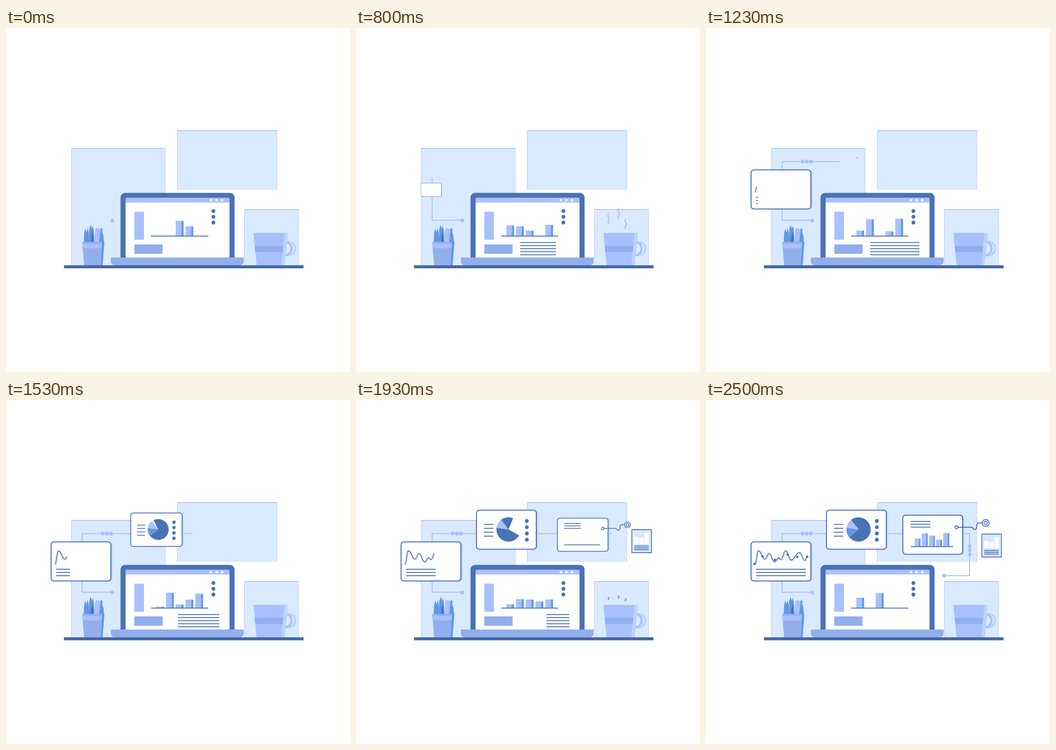
An HTML page with a canvas that plays this animation: 748x748 px, repeating every 2.71 s.

```html
<!DOCTYPE html>
<html lang="en">
<head>
<meta charset="utf-8">
<title>Desk dashboard</title>
<style>
html, body { margin: 0; width: 100%; height: 100%; overflow: hidden; background: #fff; }
canvas { display: block; }
</style>
</head>
<body>
<canvas id="stage" width="748" height="748"></canvas>
<script>
const ctx = document.getElementById('stage').getContext('2d');
const LOOP = 2710;
const REST = 2500;
const NAVY = '#4a73b5', BLUE = '#5f98e8', MID = '#92afed', LILAC = '#a9c0ff',
      SKY = '#d9eaff', PALE = '#b8d5fb', DESK = '#4766a5', EDGE = '#4668b3';

const ramp = (t, from, to) => Math.max(0, Math.min(1, (t - from) / (to - from)));
const mix = (a, b, k) => a + (b - a) * k;

// Triangle wave: 0 at the start, 1 after `half`, 0 again after twice `half`
function triangle(t, start, half) {
  const phase = (Math.max(0, t - start) / half) % 2;
  return 1 - Math.abs(1 - phase);
}

function box(x, y, w, h, color) {
  ctx.fillStyle = color;
  ctx.fillRect(x, y, w, h);
}

function rounded(x, y, w, h, r, color) {
  ctx.beginPath();
  ctx.roundRect(x, y, w, h, r);
  ctx.fillStyle = color;
  ctx.fill();
}

function dot(x, y, r, color) {
  ctx.beginPath();
  ctx.arc(x, y, r, 0, Math.PI * 2);
  ctx.fillStyle = color;
  ctx.fill();
}

function poly(color, ...points) {
  ctx.beginPath();
  points.forEach(([x, y]) => ctx.lineTo(x, y));
  ctx.fillStyle = color;
  ctx.fill();
}

function stroke(color, width) {
  ctx.strokeStyle = color;
  ctx.lineWidth = width;
  ctx.stroke();
}

// Strokes only the first `length` pixels of the current path
function strokeStart(color, width, length) {
  if (length <= 0) return;
  ctx.setLineDash([length, 2000]);
  stroke(color, width);
  ctx.setLineDash([]);
}

function rows(x0, x1, y, count = 1, gap = 0, width = 2) {
  if (x1 <= x0) return;
  for (let i = 0; i < count; i++) box(x0, y + i * gap - width / 2, x1 - x0, width, NAVY);
}

function dots(x, y, dx, dy, count, r, color) {
  for (let i = 0; i < count; i++) dot(x + i * dx, y + i * dy, r, color);
}

function bar(x, base, width, height) {
  if (height < 1.5) return;
  box(x, base - height, width, height, BLUE);
  box(x, base - height, width * 0.74, height, LILAC);
}

function scaled(cx, cy, s, draw) {
  if (s <= 0) return;
  ctx.save();
  ctx.translate(cx, cy);
  ctx.scale(s, s);
  ctx.translate(-cx, -cy);
  draw();
  ctx.restore();
}

function panel(x, y, w, h) {
  box(x, y, w, h, SKY);
  box(x, y, w, 1.3, '#a5b1f2');
  box(x, y, 1, h, '#b2bff6');
  box(x + w - 1, y, 1, h, '#c4d0fa');
}

function card(x, y) {
  rounded(x + 4, y + 1, 130, 84, 6, PALE);
  rounded(x, y, 130, 85, 6, '#fff');
  stroke(EDGE, 2);
}

function route(t) {
  const length = mix(80 * ramp(t, 0, 600), 749, ramp(t, 600, 2365));
  ctx.beginPath();
  ctx.moveTo(231, 418);
  ctx.lineTo(165.5, 418);
  ctx.lineTo(165.5, 290.5);
  ctx.lineTo(573, 290.5);
  ctx.lineTo(573, 382);
  ctx.lineTo(517, 382);
  strokeStart(LILAC, 2, length);
  dot(231, 418.5, 4.2, LILAC);
  dots(210, 290.3, 9.2, 0, 3, 4.2 * ramp(length, 235, 262), LILAC);
  dots(573.3, 318, 0, 8.8, 3, 4.2 * ramp(length, 628, 655), LILAC);
  dot(517.5, 382, 4.2 * ramp(length, 735, 748), LILAC);
}

// Peaks and valleys of the line chart
const turns = [[106, 357], [114, 328], [128, 346], [137, 334], [149, 352], [158, 343],
               [163, 347], [173, 328], [185, 348], [203, 332], [215, 349], [220, 341]];

function traceWave(shift) {
  ctx.beginPath();
  let px = 0, py = 0;
  turns.forEach(([tx, ty], i) => {
    const x = tx + shift, y = ty + shift, middle = (px + x) / 2;
    if (i) ctx.bezierCurveTo(middle, py, middle, y, x, y);
    else ctx.moveTo(x, y);
    [px, py] = [x, y];
  });
}

function waveCard(t) {
  card(98, 308.5);
  rows(109, mix(109, 217, ramp(t, 1180, 2440)), 368, 3, 7);
  const length = (t - 1150) * 0.165;
  traceWave(2);
  strokeStart('#d3e2f9', 2, length);
  traceWave(0);
  strokeStart(NAVY, 1.8, length);
  ctx.globalAlpha = ramp(t, 2200, 2450);
  [[105.5, 356.5], [123, 340], [150, 347.5], [177.5, 336], [198.5, 341], [220, 340.5]]
    .forEach(([x, y]) => dot(x, y, 2.6, NAVY));
  ctx.globalAlpha = 1;
}

function sector(from, to, color) {
  if (to <= from) return;
  const rad = Math.PI / 180;
  ctx.beginPath();
  ctx.moveTo(331.7, 281.5);
  ctx.arc(331.7, 281.5, 26.4, from * rad, to * rad);
  ctx.fillStyle = color;
  ctx.fill();
}

// A gap sweeps once around the pie, wiping the old disc ahead of the new one
function pieCard(t) {
  card(262, 239.5);
  rows(278, 298.5, 270.5, 4, 8.5);
  dots(371.5, 263, 0, 13.6, 4, 4.2, NAVY);
  const sweep = start => 232 + 360 * ramp(t, start, start + 984);
  sector(sweep(1500), 592, NAVY);
  sector(232, sweep(1766), NAVY);
  if (t < 1700 || t > 2440) sector(141, 188, BLUE);
  sector(187, 232, LILAC);
}

function chartCard(t) {
  card(428, 250.5);
  rows(445.5, 488, 264, 3, 6.2);
  const grow = ramp(t, 2000, 2440);
  [17, 28, 23.5, 14.5, 29].forEach((h, i) => bar(454 + i * 15.6, 318.5, 12.5, h * grow));
  rows(445.5, 537, 318.8);
  ctx.beginPath();
  ctx.moveTo(548, 276.8);
  ctx.lineTo(577, 276.8);
  ctx.bezierCurveTo(582, 277, 580, 281.5, 584, 281.5);
  ctx.bezierCurveTo(592, 281.5, 586, 268, 592, 267.5);
  ctx.lineTo(600, 267.5);
  stroke(EDGE, 2);
  [[544.5, 276.8, 3.3], [608, 267.5, 7.6], [608, 267.5, 3.8]].forEach(([x, y, r]) => {
    dot(x, y, r, '#fff');
    stroke(EDGE, 1.8);
  });
}

function noteCard(t) {
  const y = 282 + (t - 1930) / 60;
  scaled(621, y + 25, ramp(t, 1650, 1870), () => {
    rounded(599.7, y, 42.8, 50, 1, SKY);
    stroke('#5273b9', 1.8);
    [16, 13.5, 24].forEach((h, i) => box(605 + i * 11, y + 31 - h, 9.5, h, '#fff'));
    rows(605, 636.5, y + 35.5, 3, 4, 1.9);
  });
}

const bars = [
  { high: 23.5, start: 0, half: 820 },
  { high: 40, start: 180, half: 1160 },
  { high: 33, start: -1240, half: 1240 },
  { high: 21.5, start: -800, half: 820 },
  { high: 39, start: 0, half: 1270 }
];

function laptop(t) {
  rounded(249, 358.5, 248, 150, 10, NAVY);
  rounded(260, 369, 226, 135, [4, 4, 0, 0], '#fff');
  rounded(260, 369, 226, 10.5, [4, 4, 0, 0], LILAC);
  dots(445.5, 374.3, 12.3, 0, 3, 2.7, '#fff');
  rounded(228, 499, 289, 17.5, [1, 1, 9, 9], MID);
  rounded(279, 399.5, 21, 61, 1, LILAC);
  rounded(279, 470.5, 61.5, 20.5, 1, MID);
  dots(451, 398, 0, 12.5, 3, 4.2, NAVY);
  bars.forEach(({ high, start, half }, i) =>
    bar(327 + i * 21.2, 452.5, 16.7, high * triangle(t, start, half)));
  rows(315.5, 440, 452.5);
  rows(mix(357, 464, ramp(t, 1360, 2430)), mix(357, 464, ramp(t, 60, 1080)), 466.5, 5, 6.65);
}

function pencil(x, tip, width, color) {
  poly(color, [x, 466], [x + width * 0.15, tip + 9], [x + width / 2, tip],
       [x + width * 0.85, tip + 9], [x + width, 466]);
}

function pencilPot() {
  pencil(169, 436, 7, BLUE);
  pencil(174, 435, 7, BLUE);
  pencil(180, 428, 8, BLUE);
  pencil(185, 430, 7, BLUE);
  pencil(185, 443, 6, NAVY);
  pencil(205, 443, 8, BLUE);
  poly(BLUE, [202, 466], [206, 435], [210, 437], [206, 466]);
  poly(LILAC, [191, 466], [195, 435], [206, 437], [202, 466]);
  poly(BLUE, [207, 465], [214, 465], [210, 516.5], [205, 516.5]);
  poly(MID, [165.5, 465], [209, 465], [206, 516.5], [170, 516.5]);
  poly(LILAC, [166, 469], [208.5, 469], [208, 479], [167, 479]);
}

function handle(shift, color) {
  ctx.beginPath();
  ctx.moveTo(601 + shift, 465.5);
  ctx.lineTo(607 + shift, 465.5);
  ctx.bezierCurveTo(626 + shift, 465.5, 625 + shift, 494, 607 + shift, 494);
  ctx.lineTo(599 + shift, 494);
  stroke(color, 4.5);
}

function mug() {
  handle(8, PALE);
  handle(0, LILAC);
  poly(PALE, [604, 445.5], [613, 445.5], [606, 516.5], [597, 516.5]);
  poly(LILAC, [538, 445.5], [605.5, 445.5], [598.5, 516.5], [545, 516.5]);
  poly(MID, [540.5, 473.5], [603, 473.5], [601.5, 487], [542, 487]);
}

// Each puff stretches upwards from the rim, then fades
function puff(age) {
  const rise = ramp(age, 0, 625);
  const fade = ramp(age, 630, 725);
  if (rise <= 0 || fade >= 1) return;
  ctx.globalAlpha = 1 - fade;
  [[549.5, 403], [571.5, 392], [586.5, 414]].forEach(([x, top]) => {
    const y = v => mix(437, top + v, rise);
    ctx.beginPath();
    ctx.moveTo(x + 0.5, y(0));
    ctx.bezierCurveTo(x - 5, y(7), x + 1, y(8), x + 1.5, y(12));
    ctx.bezierCurveTo(x + 2, y(17), x - 5, y(17), x, y(23));
    stroke('#4a86d0', 1.2);
  });
  ctx.globalAlpha = 1;
}

function draw(t) {
  box(0, 0, 748, 748, '#fff');
  panel(142, 261, 204.5, 255.5);
  panel(372, 222.5, 217.5, 129.5);
  panel(518, 394, 119, 122.5);
  route(t);
  scaled(163.5, 352, ramp(t, 677, 1040), () => waveCard(t));
  scaled(327.5, 282, ramp(t, 1217, 1583), () => pieCard(t));
  scaled(492.5, 293, ramp(t, 1592, 1992), () => chartCard(t));
  noteCard(t);
  pencilPot();
  mug();
  puff(t - 140);
  puff(t - 1774);
  laptop(t);
  box(126, 516, 521, 6.5, DESK);
}

const start = performance.now();
function tick() {
  draw(Math.min((performance.now() - start) % LOOP, REST));
  requestAnimationFrame(tick);
}
tick();
</script>
</body>
</html>
```
